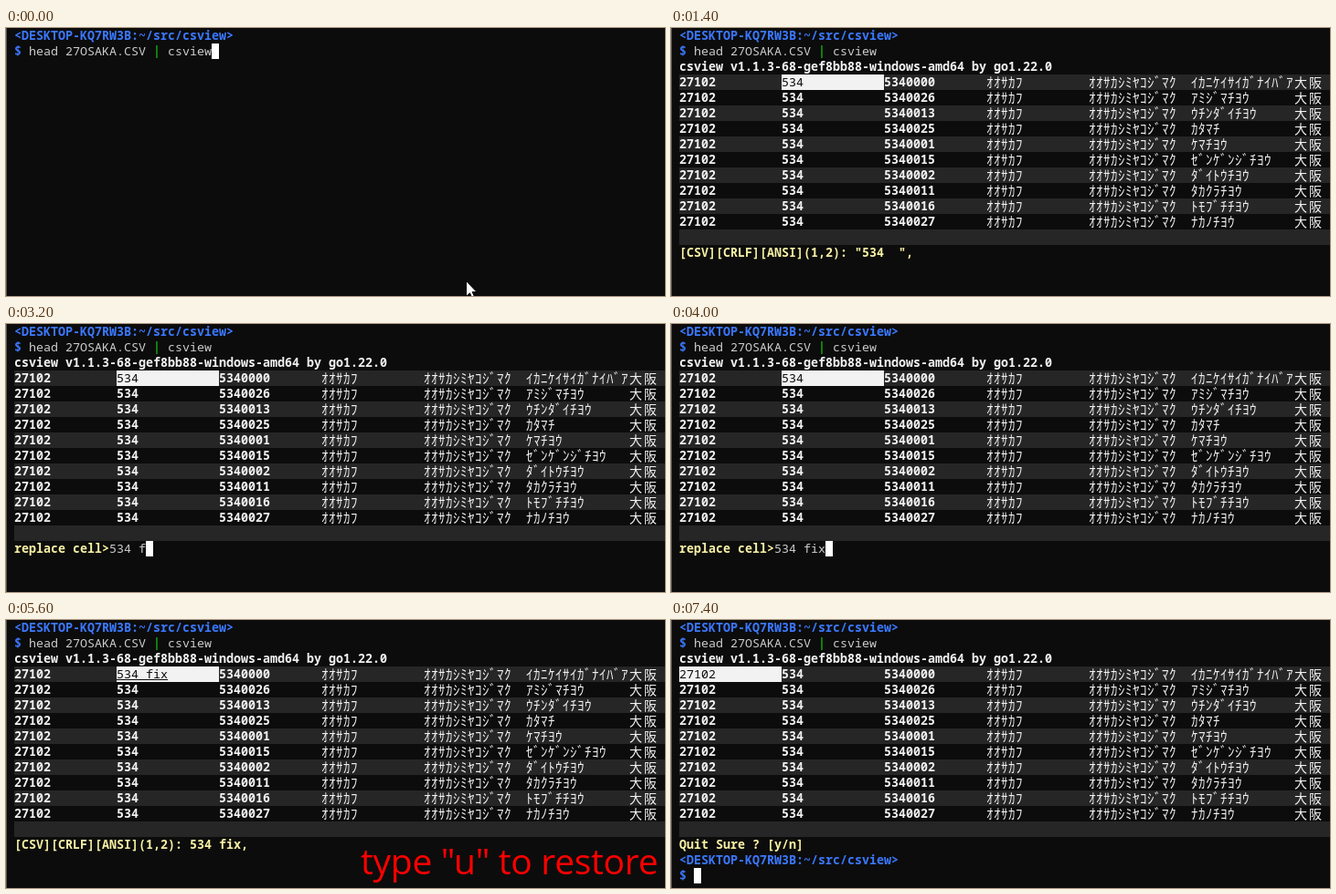
An HTML page with a canvas for the animation above (8 s loop, 721x294 px).

```html
<!DOCTYPE html>
<html lang="en">
<head>
<meta charset="utf-8">
<title>csview cell editing</title>
<style>
  html, body { margin: 0; width: 100%; height: 100%; overflow: hidden; background: #0c0c0c; }
  canvas { display: block; }
</style>
</head>
<body>
<canvas id="stage" width="721" height="294"></canvas>
<script>
const ctx = document.getElementById('stage').getContext('2d');
const LOOP = 8000, WIDTH = 721, HEIGHT = 294;
const LEFT = 9, CELL = 8, LINE = 17, COLUMN = 14;
const TABLE_TOP = 3, STATUS = 14;
const BACK = '#0c0c0c', STRIPE = '#262626', GREY = '#cccccc', WHITE = '#f2f2f2';
const BLUE = '#3b78ff', GREEN = '#13a10e', YELLOW = '#f9f1a5';

const towns = [
  ['0000', 'ｲｶﾆｹｲｻｲｶﾞﾅｲﾊﾞｱ'], ['0026', 'ｱﾐｼﾞﾏﾁﾖｳ'], ['0013', 'ｳﾁﾝﾀﾞｲﾁﾖｳ'],
  ['0025', 'ｶﾀﾏﾁ'], ['0001', 'ｹﾏﾁﾖｳ'], ['0015', 'ｾﾞﾝｹﾞﾝｼﾞﾁﾖｳ'],
  ['0002', 'ﾀﾞｲﾄｳﾁﾖｳ'], ['0011', 'ﾀｶｸﾗﾁﾖｳ'], ['0016', 'ﾄﾓﾌﾞﾁﾁﾖｳ'], ['0027', 'ﾅｶﾉﾁﾖｳ']
];
const table = towns.map(([code, town]) =>
  ['27102', '534', '534' + code, 'ｵｵｻｶﾌ', 'ｵｵｻｶｼﾐﾔｺｼﾞﾏｸ', town, '大阪']);

// Each step changes only the listed properties of the state.
const steps = [
  [0, { mouse: true, running: false, selected: 0, value: '27102' }],
  [600, { running: true }],
  [1000, { mouse: false }],
  [1400, { selected: 1, value: '"534  "' }],
  [1800, { caption: 'type "r" to replace' }],
  [2400, { caption: '', input: '534  ' }],
  [2800, { input: '534 ' }],
  [3200, { input: '534 f' }],
  [3600, { input: '534 fi' }],
  [4000, { input: '534 fix' }],
  [4400, { input: null, edited: true, value: '534 fix' }],
  [4800, { selected: 2, value: '"5340000"' }],
  [5200, { selected: 1, value: '534 fix' }],
  [5600, { caption: 'type "u" to restore' }],
  [6200, { caption: '', edited: false, value: '"534  "' }],
  [6600, { selected: 0, value: '27102' }],
  [7000, { quitting: true }],
  [7400, { ended: true }]
];

function stateAt(time) {
  const state = { caption: '', input: null };
  for (const [start, change] of steps) if (time >= start) Object.assign(state, change);
  return state;
}

function fillCells(row, col, count, color) {
  ctx.fillStyle = color;
  ctx.fillRect(LEFT + col * CELL, row * LINE, count * CELL, LINE);
}

// Writes on the terminal grid; kanji take two cells and are centred in them.
function write(row, col, text, color, weight = 400) {
  ctx.fillStyle = color;
  for (const char of text) {
    const kanji = char >= '\u4e00' && char <= '\u9fff';
    const japanese = char > '\u2fff';
    ctx.font = japanese
      ? `400 ${kanji ? 14 : 15}px "Noto Sans CJK JP", "Noto Sans CJK", sans-serif`
      : `${weight} 13.333px "Noto Sans Mono", "DejaVu Sans Mono", monospace`;
    ctx.fillText(char, LEFT + col * CELL + (kanji ? 1 : 0), row * LINE + (japanese ? 14 : 13));
    col += kanji ? 2 : 1;
  }
}

function drawPrompt(row) {
  write(row, 0, '<DESKTOP-KQ7RW3B:~/src/csview>', BLUE, 600);
  write(row + 1, 0, '$', BLUE, 600);
}

function drawTable({ selected, edited }) {
  write(2, 0, 'csview v1.1.3-68-gef8bb88-windows-amd64 by go1.22.0', WHITE, 700);
  for (let i = 0; i <= table.length; i += 2) fillCells(TABLE_TOP + i, 0, 89, STRIPE);
  table.forEach((cells, i) => cells.forEach((cell, j) => {
    const row = TABLE_TOP + i, col = j * COLUMN;
    const active = i === 0 && j === selected;
    const changed = edited && i === 0 && j === 1;
    const color = active ? BACK : WHITE;
    if (active) fillCells(row, col, COLUMN, WHITE);
    write(row, col, changed ? '534 fix' : cell, color, active ? 400 : 700);
    if (changed) ctx.fillRect(LEFT + col * CELL, row * LINE + 14, 7 * CELL, 1);
  }));
}

function drawStatus({ input, quitting, selected, value }) {
  if (quitting) {
    write(STATUS, 0, 'Quit Sure ? [y/n]', YELLOW, 700);
  } else if (input !== null) {
    const label = 'replace cell>';
    write(STATUS, 0, label, YELLOW, 700);
    write(STATUS, label.length, input, GREY);
    fillCells(STATUS, label.length + input.length, 1, '#fff');
  } else {
    write(STATUS, 0, `[CSV][CRLF][ANSI](1,${selected + 1}): ${value},`, YELLOW, 700);
  }
}

function drawCaption(text) {
  ctx.font = '39px "Open Sans", "Noto Sans", sans-serif';
  ctx.letterSpacing = '-0.3px';
  ctx.fillStyle = '#f00';
  ctx.fillText(text, 388, 279);
  ctx.letterSpacing = '0px';
}

function drawMouse() {
  const arrow = new Path2D('M503.5 277.5V294.5L507.5 290.8L510 296.5L512.8 295.3L510.2 289.6H515Z');
  ctx.fillStyle = '#fff';
  ctx.fill(arrow);
  ctx.strokeStyle = '#000';
  ctx.lineWidth = 1;
  ctx.stroke(arrow);
}

function draw(time) {
  const state = stateAt(time);
  ctx.fillStyle = BACK;
  ctx.fillRect(0, 0, WIDTH, HEIGHT);
  ctx.fillStyle = '#555';
  ctx.fillRect(0, 0, 1, HEIGHT);

  drawPrompt(0);
  write(1, 2, 'head 27OSAKA.CSV', GREY, 500);
  write(1, 19, '|', GREEN, 700);
  write(1, 21, 'csview', GREY, 500);

  if (state.running) {
    drawTable(state);
    drawStatus(state);
  } else {
    fillCells(1, 27, 1, '#fff');
  }
  if (state.ended) {
    drawPrompt(15);
    fillCells(16, 2, 1, '#fff');
  }
  if (state.caption) drawCaption(state.caption);
  if (state.mouse) drawMouse();
}

const began = performance.now();
function tick() {
  draw((performance.now() - began) % LOOP);
  requestAnimationFrame(tick);
}
tick();
</script>
</body>
</html>
```
